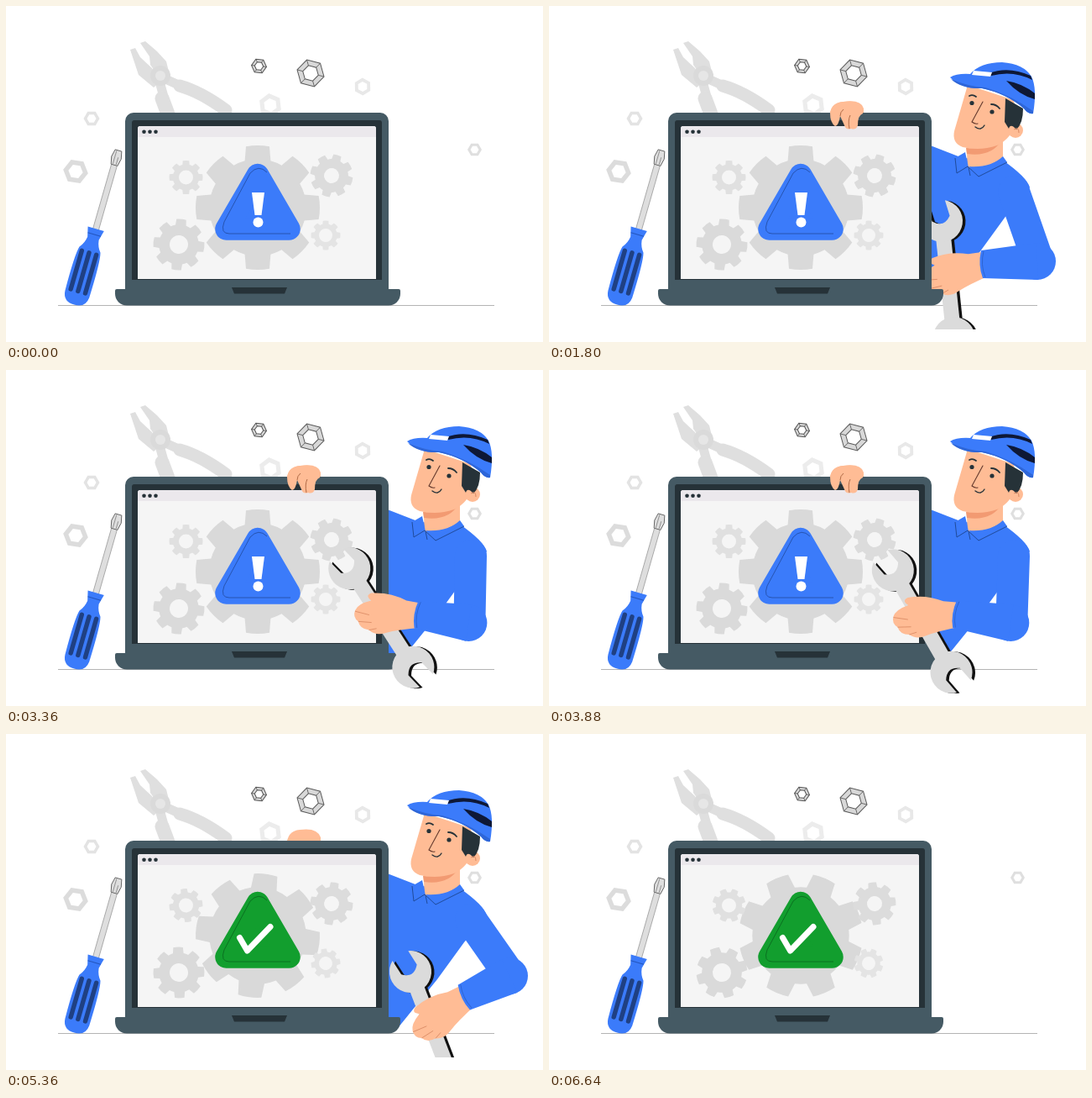
Animation of 640 by 400 pixels, one loop 6680 ms. Source, as an HTML page with a canvas:

```html
<!DOCTYPE html>
<html lang="en">
<head>
<meta charset="utf-8">
<title>Repair in progress</title>
<style>
html, body { margin: 0; width: 100%; height: 100%; overflow: hidden; background: #fff; }
canvas { display: block; width: 640px; height: 400px; }
</style>
</head>
<body>
<canvas id="stage" width="640" height="400"></canvas>
<script>
const c = document.getElementById('stage').getContext('2d');
const LOOP = 6680, TAU = Math.PI * 2;
const BLUE = '#3b7bfa', NAVY = '#0e1836', SKIN = '#ffbc95', DARK = '#263238',
      SLATE = '#455a64', STEEL = '#dedede', PALE = '#e3e3e3';

const clamp = v => Math.max(0, Math.min(1, v));
const mix = (a, b, k) => a + (b - a) * k;
const smooth = k => k * k * (3 - 2 * k);
const span = (t, a, b) => clamp((t - a) / (b - a));
const mixAll = (a, b, k) => a.map((v, i) => mix(v, b[i], k));
const rgb = v => `rgb(${v.map(Math.round)})`;

function at(x, y, angle, draw) {
  c.save();
  c.translate(x, y);
  c.rotate(angle);
  draw();
  c.restore();
}
function poly(pts, fill, stroke, width = 1) {
  c.beginPath();
  pts.forEach(p => c.lineTo(p[0], p[1]));
  c.closePath();
  if (fill) { c.fillStyle = fill; c.fill(); }
  if (stroke) { c.strokeStyle = stroke; c.lineWidth = width; c.stroke(); }
}
function shape(d, fill) {
  c.fillStyle = fill;
  c.fill(new Path2D(d));
}
function line(d, color, width = 1) {
  c.strokeStyle = color;
  c.lineWidth = width;
  c.stroke(new Path2D(d));
}
function disc(x, y, r, fill) {
  c.beginPath();
  c.arc(x, y, r, 0, TAU);
  c.fillStyle = fill;
  c.fill();
}
function box(x, y, w, h, r, fill) {
  c.beginPath();
  c.roundRect(x, y, w, h, r);
  c.fillStyle = fill;
  c.fill();
}

// ---- scenery ----
function hexagon(r, turn) {
  return Array.from({ length: 6 }, (_, i) => {
    const a = turn + i * TAU / 6;
    return [Math.cos(a) * r, Math.sin(a) * r];
  });
}
function nut(x, y, r, turn, color, ink) {
  at(x, y, turn, () => {
    const outer = hexagon(r, 0), inner = hexagon(r * 0.58, 0);
    poly(outer, color, ink);
    poly(inner, '#fff', ink);
    if (ink) outer.forEach((p, i) => line(`M${p}L${inner[i]}`, ink, 0.8));
  });
}
function nuts() {
  nut(102, 134, 9.5, 0, PALE);
  nut(83, 197, 15, 0.15, '#dcdcdc');
  nut(315, 118, 14, 0.4, '#ececec');
  nut(425, 96, 10.5, 0.5, '#e8e8e8');
  nut(558.5, 171, 8.5, 0, '#dfdfdf');
  nut(301.5, 71.5, 9, 0.1, '#d8d8d8', '#555');
  nut(363, 80, 16.5, 0.25, '#d8d8d8', '#5a5a5a');
}
function pliers() {
  const g = '#dfdfdf';
  shape('M148 52L154 50L160 61L174 74L184 90L176 97L158 82Z', g);
  shape('M160 44L166 42L180 54L191 66L194 78L182 84L172 70L171 60Z', g);
  c.lineCap = 'round';
  line('M188 86L210 96M183 90L188 108', g, 11);
  line('M207 95Q232 102 262 124', g, 15);
  line('M186 110L195 134', g, 17);
  disc(184, 83, 12, '#dadada');
  disc(184, 83, 6, '#e6e6e6');
  c.lineCap = 'butt';
}
function screwdriver() {
  at(134, 172, 0.28, () => {
    box(-3.5, 17, 7, 86, 0, STEEL);
    line('M-3.5 17V100M3.5 17V100', '#a0a0a0', 0.8);
    poly([[-4, 0], [4, 0], [6, 9], [4, 18], [-4, 18], [-6, 9]], STEEL, '#666', 0.9);
    line('M-2 1V17M2 8V17', '#888', 0.8);
    shape('M-10 97H10L7 109Q8 117 13 123Q16 133 15 178Q14 191 0 191Q-14 191 -15 178Q-16 133 -13 123Q-8 117 -7 109Z', BLUE);
    line('M-8 104H8', '#2456bd', 1);
    for (const x of [-9, 0, 9]) box(x - 2.7, 124, 5.4, 53, 2.7, '#1f4083');
  });
}

// ---- laptop ----
function gear(x, y, r, hole, turn, color) {
  at(x, y, turn, () => {
    const n = 8, root = r * 0.78;
    c.beginPath();
    for (let i = 0; i < n; i++) {
      const a = i * TAU / n;
      c.arc(0, 0, r, a - 0.19, a + 0.19);
      c.arc(0, 0, root, a + 0.27, a + TAU / n - 0.27);
    }
    c.closePath();
    c.moveTo(hole, 0);
    c.arc(0, 0, hole, 0, TAU, true);
    c.fillStyle = color;
    c.fill();
  });
}
function sign(color, ink) {
  const core = [[300, 201], [262.5, 265.5], [337.5, 265.5]];
  c.lineJoin = 'round';
  poly(core, color, color, 26.5);
  c.lineJoin = 'miter';
  line('M311 198Q301 188 291 199L260 257Q255 271 266 271H339', ink, 0.9);
}
function warning(t) {
  const k = span(t, 4640, 5000);
  sign(rgb(mixAll([59, 123, 250], [18, 158, 46], k)), rgb(mixAll([36, 80, 168], [11, 107, 32], k)));
  c.globalAlpha = 1 - k;
  poly([[293, 222], [308, 222], [304.5, 249], [296.5, 249]], '#fff');
  disc(300.5, 257.5, 6, '#fff');
  c.globalAlpha = k;
  if (t > 4760) {
    c.lineCap = c.lineJoin = 'round';
    c.setLineDash([70, 70]);
    c.lineDashOffset = 70 * (1 - smooth(span(t, 4760, 5080)));
    line('M278.5 242.5L287.5 258L315 229.5', '#fff', 7);
    c.setLineDash([]);
    c.lineCap = 'butt';
    c.lineJoin = 'miter';
  }
  c.globalAlpha = 1;
}
function laptop(t) {
  box(142, 127, 314, 220, 10, SLATE);
  box(150, 136, 298, 190, [3, 3, 0, 0], DARK);
  box(157, 143, 284, 182, [3, 3, 0, 0], '#f5f5f5');
  box(157, 143, 284, 13, [3, 3, 0, 0], '#ebe8ec');
  for (const x of [164.5, 171.5, 178.5]) disc(x, 149.7, 2.3, DARK);
  const turn = Math.max(0, t - 4720) / 1000 * 11.7 * Math.PI / 180;
  gear(300, 240, 74, 20, turn, '#d9d9d9');
  gear(388, 202, 25.5, 9, 0.28 - turn, '#dcdcdc');
  gear(206, 284, 30.5, 11, 0.1 - turn, '#dadada');
  gear(214.5, 204, 20, 8.5, -turn, '#e0e0e0');
  gear(381, 273, 17.5, 8, -turn, '#e4e4e4');
  warning(t);
  box(130, 337, 340, 19.5, [2, 2, 14, 14], SLATE);
  poly([[269, 335], [335, 335], [332, 342.5], [272, 342.5]], DARK);
}

// ---- worker ----
function torso() {
  shape('M400 150L457 167L493 181L540 183Q570 204 573 216L546 248L514 292L467 350H400Z', BLUE);
  shape('M497 160L541 155V184Q522 200 499 192Z', SKIN);
  shape('M497 169Q522 172 539 160Q528 180 498 176Z', '#f29a72');
  shape('M496 174L500 192L485 199L484 181ZM541 179L546 186L512 203L500 191Q526 193 541 179Z', BLUE);
  line('M484 181L486 199L499 191L512 203L546 186M500 192L502 202', '#1d468f', 0.9);
}
function head() {
  shape('M499 94L554 112L557 138Q551 158 534 166Q514 173 493 168Q480 163 483 149Z', SKIN);
  disc(556, 148, 9, SKIN);
  shape('M544 110L565 122Q565 140 557 147Q550 139 548 146L543 138Z', DARK);
  line('M554 147Q560 143 560 151', '#d98963', 1);
  disc(504, 115.5, 2.6, DARK);
  disc(528, 126, 2.6, DARK);
  c.lineCap = 'round';
  line('M501 107Q505 105 509 108M527 117Q533 117 537 122', DARK, 1.8);
  line('M517 114L504 138Q508 141 511 140', '#63392d', 1.1);
  line('M508 144Q515 149 519 142', DARK, 1.4);
  c.lineCap = 'butt';
  shape('M478 85Q486 80 502 81Q514 67 540 67Q566 69 575 84Q582 98 577 128Q571 129 566 122Q545 104 516 98Q492 99 478 85Z', BLUE);
  shape('M479 87Q500 96 520 97Q550 106 577 125V128Q571 129 566 122Q545 104 516 98Q492 99 479 87Z', '#2e66d8');
  shape('M524 80Q548 71 574 83L576 88Q553 76 527 83Z', NAVY);
  shape('M545 89Q564 92 579 104V111Q560 106 545 89Z', NAVY);
  poly([[506, 77], [528, 79], [526, 84], [504, 82]], '#fff');
}
function topHand(t) {
  const drop = 30 * (1 - smooth(span(t, 950, 1150)) + smooth(span(t, 5400, 5600)));
  if (drop < 30) shape(`M334 ${134 + drop}Q335 ${115 + drop} 350 ${114 + drop}Q371 ${111 + drop} 375 ${123 + drop}V${134 + drop}Z`, SKIN);
}
function topFingers(t) {
  if (t < 1180 || t > 5240) return;
  const y = mix(128, 148, span(t, 1180, 1340) - span(t, 5080, 5240));
  c.save();
  c.beginPath();
  c.rect(330, 110, 50, y - 110);
  c.clip();
  shape('M335 127Q337 115 351 114Q372 111 375 122L374 128Q368 130 368 142Q366 148 360 146Q354 148 352 142L347 131Q345 143 341 143Q335 139 335 127Z', SKIN);
  line('M347 131Q347 126 351 123M358 146Q356 136 359 130', '#a8623f', 0.9);
  c.restore();
}
function wrenchShape(color) {
  box(14, -9, 112, 18, 0, color);
  for (const [x, dir] of [[0, Math.PI - 0.2], [140, -0.2]]) {
    at(x, 0, dir, () => {
      const r = 25, a = 0.46;
      c.beginPath();
      c.arc(0, 0, r, a, TAU - a);
      c.lineTo(3, -11);
      c.quadraticCurveTo(-9, 0, 3, 11);
      c.closePath();
      c.fillStyle = color;
      c.fill();
    });
  }
}
function wrench(x, y, angle) {
  at(x + 3.5, y + 0.5, angle, () => wrenchShape('#111'));
  at(x, y, angle, () => wrenchShape('#dbdbdb'));
}
function arm([hx, hy, deg, ex, ey, wx, wy]) {
  const angle = deg * Math.PI / 180;
  wrench(hx, hy, angle);
  const gx = hx + 65 * Math.cos(angle), gy = hy + 65 * Math.sin(angle);
  at(wx, wy, Math.atan2(gy - wy, gx - wx), () => {
    // the local axes are flipped so that the thumb stays on top
    c.scale(1, -1);
    shape('M-6 -14L12 -17Q32 -27 54 -25Q62 -22 54 -16Q70 -12 73 -4Q76 4 69 9Q67 18 56 19Q48 26 36 22Q22 18 -6 15Z', SKIN);
    line('M73 -3L56 1M69 9L53 10M56 19L47 17', '#d98963', 0.8);
  });
  c.lineCap = 'round';
  line(`M554 221L${ex + 1} ${ey}`, BLUE, 38);
  c.lineCap = 'butt';
  disc(ex, ey, 22, BLUE);
  const a = Math.atan2(wy - ey, wx - ex);
  at(ex, ey, a, () => {
    const d = Math.hypot(wx - ex, wy - ey);
    shape(`M0 -22L${d} -16Q${d + 5} 0 ${d} 17L0 22Z`, BLUE);
    line(`M${d - 3} -15Q${d + 2} 0 ${d - 3} 16`, '#2b62cf', 0.9);
  });
}

// wrench x, y, degrees; elbow x, y; wrist x, y
const HIDDEN = [425, 265, 90, 552, 301, 480, 305];
const SIDE = [468, 256, 84, 582, 304, 516, 308];
const OUT = [482, 283, 69, 600, 288, 546, 314];
const NEAR = [409, 235, 55.4, 552, 301, 492, 292];
const FAR = [410, 239, 61, 550, 301, 482, 291];
const KEYS = [
  [1200, HIDDEN], [1800, SIDE], [2040, OUT], [2760, NEAR],
  [4760, NEAR], [5320, OUT], [5440, OUT], [5660, SIDE], [5880, HIDDEN]
];
function pose(t) {
  if (t > 2840 && t < 4760) {
    return mixAll(NEAR, FAR, (1 - Math.cos((t - 2840) / 640 * TAU)) / 2);
  }
  const i = KEYS.findIndex(k => k[0] > t);
  if (i <= 0) return HIDDEN;
  const [t0, a] = KEYS[i - 1], [t1, b] = KEYS[i];
  return mixAll(a, b, smooth((t - t0) / (t1 - t0)));
}
function worker(t, inFront) {
  const away = 1 - smooth(span(t, 850, 1350)) + smooth(span(t, 5640, 6100));
  if (away >= 1) return;
  c.save();
  c.beginPath();
  c.rect(0, 0, 640, away > 0 ? 356 : 385);
  c.clip();
  c.translate(-150 * away, 90 * away);
  const armInFront = t > 2040 && t < 5320;
  if (!inFront) {
    torso();
    head();
  }
  if (inFront === armInFront) arm(pose(t));
  c.restore();
}

function draw(t) {
  c.fillStyle = '#fff';
  c.fillRect(0, 0, 640, 400);
  pliers();
  nuts();
  c.fillStyle = '#b4b4b4';
  c.fillRect(62, 356, 520, 1);
  topHand(t);
  worker(t, false);
  laptop(t);
  topFingers(t);
  worker(t, true);
  screwdriver();
}

const start = performance.now();
function frame() {
  draw((performance.now() - start) % LOOP);
  requestAnimationFrame(frame);
}
frame();
</script>
</body>
</html>
```
